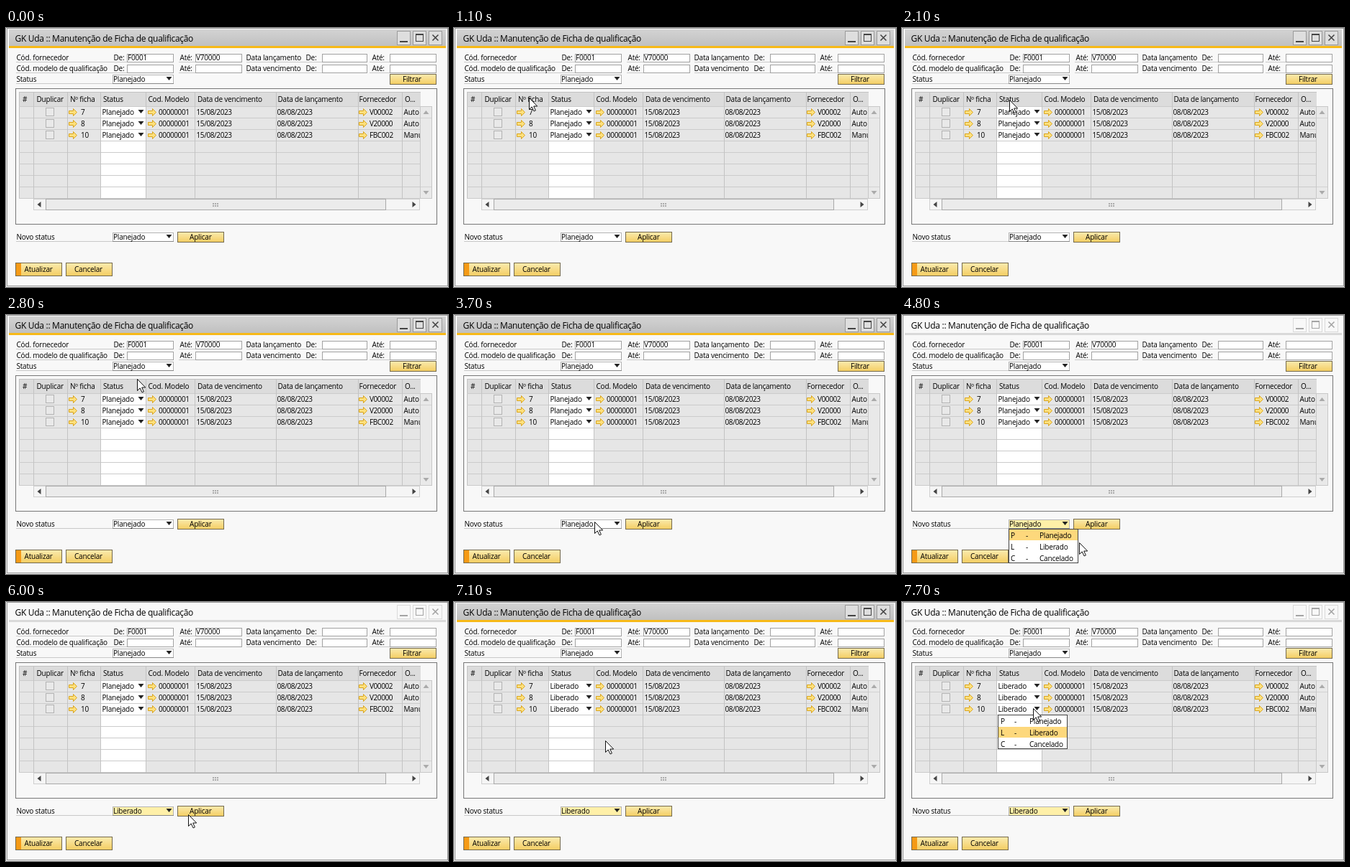
These frames come from a looping animation (614x361 px, 8000 ms). An HTML page:

```html
<!DOCTYPE html>
<html lang="pt">
<head>
<meta charset="utf-8">
<style>
html, body { margin: 0; width: 100%; height: 100%; overflow: hidden; background: #f1f1f1; }
svg { display: block; width: 614px; height: 361px; }
text { font: 10px "Open Sans", "Noto Sans", sans-serif; letter-spacing: -.2px; fill: #000; white-space: pre; }
.title { font-size: 12px; letter-spacing: -.3px; }
.code { letter-spacing: -.4px; }
rect { shape-rendering: crispEdges; }
</style>
</head>
<body>
<svg id="stage" viewBox="0 0 614 361">
  <defs>
    <linearGradient id="gold" x2="0" y2="1"><stop stop-color="#fbebaf"/><stop offset="1" stop-color="#f3cd62"/></linearGradient>
    <linearGradient id="bar" x2="0" y2="1"><stop stop-color="#d3d3d3"/><stop offset="1" stop-color="#c0c0c0"/></linearGradient>
    <clipPath id="table"><rect x="18" y="89" width="557" height="149"/></clipPath>
  </defs>
</svg>
<script>
const stage = document.getElementById('stage');
const LOOP = 8000, STEP = 100;
const STATES = ['Planejado', 'Liberado', 'Cancelado'];

// A stroked box keeps its border inside x, y, w, h
const box = (x, y, w, h, fill, stroke = 'none') => stroke === 'none'
  ? `<rect x="${x}" y="${y}" width="${w}" height="${h}" fill="${fill}"/>`
  : `<rect x="${x + .5}" y="${y + .5}" width="${w - 1}" height="${h - 1}" fill="${fill}" stroke="${stroke}"/>`;
const text = (x, y, s, cls = '') => `<text x="${x}" y="${y}" class="${cls}">${s}</text>`;
const path = (d, fill, stroke = 'none', width = 1) =>
  `<path d="${d}" fill="${fill}" stroke="${stroke}" stroke-width="${width}"/>`;
const hline = (x, y, w, color = '#c9c9c9') => box(x, y, w, 1, color);
const vline = (x, y, h, color = '#c9c9c9') => box(x, y, 1, h, color);
const triangle = (x, y) => path(`M${x - 4} ${y - 2}h8l-4 5z`, '#222');
const link = (x, y) => path(`M${x + .5} ${y - 1.5}h6v-3l5 5l-5 5v-3h-6z`, '#fde07c', '#d9a520');

function field(x, y, w, value = '') {
  return box(x, y, w, 12, '#fff', '#a2a2a2') + text(x + 1, y + 9, value);
}

function combo(y, value, fill = '#fff') {
  return box(148, y, 85, 13, fill, '#b4b4b4') + hline(148, y + 12, 85, '#888') +
    text(149, y + 10, value) + triangle(226.5, y + 5);
}

function button(x, y, w, h, label, dx) {
  return box(x, y, w, h, 'url(#gold)', '#746a4d') + text(x + dx, y + h / 2 + 3.5, label);
}

function popup(x, y, cols, active) {
  return box(x, y, 97, 48, '#fff', '#444') + STATES.map((s, i) =>
    (i === active ? box(x + 1, y + 1 + i * 16, 95, 15, '#fdd87c') : '') +
    [s[0], '-', s].map((c, k) => text(x + cols[k], y + 13 + i * 16, c)).join('')).join('');
}

function titleBar(active) {
  const edge = active ? '#9b9b9b' : '#dadada';
  const ink = active ? '#444' : '#a4a4a4';
  const face = active ? '#dedede' : '#f8f8f8';
  return box(4, 2, 607, 23, active ? 'url(#bar)' : '#f8f8f8') +
    box(4, 25, 607, 3, active ? '#f7b917' : '#d9d9d9') +
    [543, 565, 587].map(x => box(x, 4, 19, 20, face, edge)).join('') +
    box(547, 18, 11, 2, ink) + box(569, 8, 11, 11, 'none', ink) + hline(569, 9, 11, ink) +
    path('M592.5 9.5l8 8m0-8l-8 8', 'none', ink, 1.6) +
    text(12.5, 19, 'GK Uda :: Manutenção de Ficha de qualificação', 'title');
}

function filters() {
  const rows = [
    [36, 'Cód. fornecedor', 'Data lançamento', 'F0001', 'V70000'],
    [51, 'Cód. modelo de qualificação', 'Data vencimento', '', '']
  ];
  return rows.map(([y, left, right, from, to]) =>
    hline(14, y + 11, 154) + hline(240, y + 11, 23) + hline(334, y + 11, 105) + hline(505, y + 11, 28) +
    text(14.5, y + 9, left) + text(149.5, y + 9, 'De:') + field(168, y, 65, from) +
    text(241.5, y + 9, 'Até:') + field(263, y, 65, to) +
    text(333.5, y + 9, right) + text(416.5, y + 9, 'De:') + field(439, y, 63) +
    text(508.5, y + 9, 'Até:') + field(533, y, 65)).join('') +
    hline(14, 77, 134) + text(14.5, 75, 'Status') + combo(65, 'Planejado') +
    button(533, 64, 65, 15, 'Filtrar', 18);
}

function table() {
  const heads = [[23, '#'], [42.5, 'Duplicar'], [89, 'Nº ficha'], [135, 'Status'], [197.5, 'Cod. Modelo'],
    [266, 'Data de vencimento'], [377.5, 'Data de lançamento'], [490.5, 'Fornecedor'], [554, 'O...']];
  const rows = [['7', 'V00002', 'Auto'], ['8', 'V20000', 'Auto'], ['10', 'FBC002', 'Manu']];
  let s = box(13, 84, 586, 190, '#f8f8f8', '#777') + box(18, 89, 558, 149, '#e6e6e6', '#c2c2c2') +
    box(19, 90, 557, 19, '#dcdcdc') + box(132, 110, 62, 127, '#fff');
  for (let y = 109; y < 238; y += 16) s += hline(18, y, 558, '#cbcbcb');
  for (const x of [38, 85, 131, 194, 262, 375, 489, 550]) s += vline(x, 90, 148, '#c3c3c3');
  s += heads.map(([x, h]) => text(x, 103, h)).join('');
  s += '<g clip-path="url(#table)">' + rows.map(([id, vendor, kind], i) => {
    const y = 121 + i * 16, mid = y - 4;
    return box(55, y - 10, 12, 12, '#e9e9e9', '#b2b2b2') +
      link(87, mid) + text(104, y, id) + triangle(187.5, mid - 1) +
      link(197, mid) + text(212, y, '00000001', 'code') +
      text(264.5, y, '15/08/2023', 'code') + text(376.5, y, '08/08/2023', 'code') +
      link(490, mid) + text(505, y, vendor, 'code') + text(552.5, y, kind);
  }).join('') + '</g>';
  return s + scrollbars();
}

function scrollbars() {
  let s = box(575, 109, 17, 129, '#e9e9e9', '#c8c8c8') +
    hline(576, 125, 15, '#d2d2d2') + hline(576, 221, 15, '#d2d2d2') +
    path('M579.5 120h8l-4-5z', '#aaa') + path('M579.5 227h8l-4 5z', '#aaa') +
    box(38, 238, 537, 16, '#f5f5f5', '#cfcfcf') +
    box(55, 238, 473, 16, '#ebebeb', '#a9a9a9') +
    path('M48.5 242v8l-5-4z', '#444') + path('M564.5 242v8l5-4z', '#444');
  for (let i = 0; i < 6; i++) s += box(287 + (i % 3) * 3, 244 + (i > 2) * 3, 2, 2, '#aaa');
  return s;
}

const group = html => {
  const g = document.createElementNS('http://www.w3.org/2000/svg', 'g');
  g.innerHTML = html;
  return stage.appendChild(g);
};

group(box(1, 0, 613, 360, '#f8f8f8', '#9a9a9a') + filters() + table() +
  hline(14, 297, 134) + text(14.5, 295, 'Novo status') +
  button(238, 284, 65, 15, 'Aplicar', 17) +
  button(13, 327, 65, 19, 'Atualizar', 12.5) + box(14, 328, 7, 17, '#f59a16') +
  button(83, 327, 65, 19, 'Cancelar', 12));
const view = group('');
const cursor = group(path('M.5 .5v16l3.7-3.6l2.8 6l2.4-1l-2.7-5.9h5z', '#fff', '#111'));

// Pointer stops: time, x, y
const stops = [
  [600, 223, 0], [800, 150, 42], [1000, 78, 102], [1200, 130, 92], [1400, 177, 77], [1600, 184, 75],
  [1700, 184, 75], [2100, 149, 100], [2300, 133, 119], [2500, 195, 147], [2600, 197, 137], [2800, 182, 89],
  [2900, 182, 89], [3200, 210, 190], [3500, 195, 288], [4100, 195, 288], [4400, 233, 303],
  [4500, 233, 303], [4800, 246, 317], [5300, 236, 320], [5500, 236, 320], [5800, 250, 298],
  [5900, 250, 298], [6000, 253, 296], [7000, 253, 296], [7100, 210, 193], [7400, 182, 148], [LOOP, 182, 148]
];

function pointer(t) {
  const i = Math.max(1, stops.findIndex(p => p[0] >= t));
  const [t0, x0, y0] = stops[i - 1], [t1, x1, y1] = stops[i];
  const k = (t - t0) / (t1 - t0);
  return [Math.round(x0 + (x1 - x0) * k), Math.round(y0 + (y1 - y0) * k)];
}

function render(t) {
  const listOpen = t >= 3800 && t < 5300, cellOpen = t >= 7700;
  const active = t < 3800 || (t >= 6100 && !cellOpen);
  const status = STATES[+(t >= 6300)];
  view.innerHTML = titleBar(active) +
    [121, 137, 153].map(y => text(133.5, y, status)).join('') +
    combo(285, STATES[+(t >= 5300)], t < 3800 ? '#fff' : '#fff0a8') +
    (listOpen ? popup(148, 298, [3, 24, 43], +(t >= 4900)) : '') +
    (cellOpen ? popup(133, 157, [4, 23, 44], 1) : '');
  cursor.style.display = t < 600 ? 'none' : '';
  if (t >= 600) cursor.setAttribute('transform', `translate(${pointer(t)})`);
}

let last = -1;
function tick(now) {
  const t = Math.floor(now % LOOP / STEP) * STEP;
  if (t !== last) render(last = t);
  requestAnimationFrame(tick);
}
tick(0);
</script>
</body>
</html>
```
